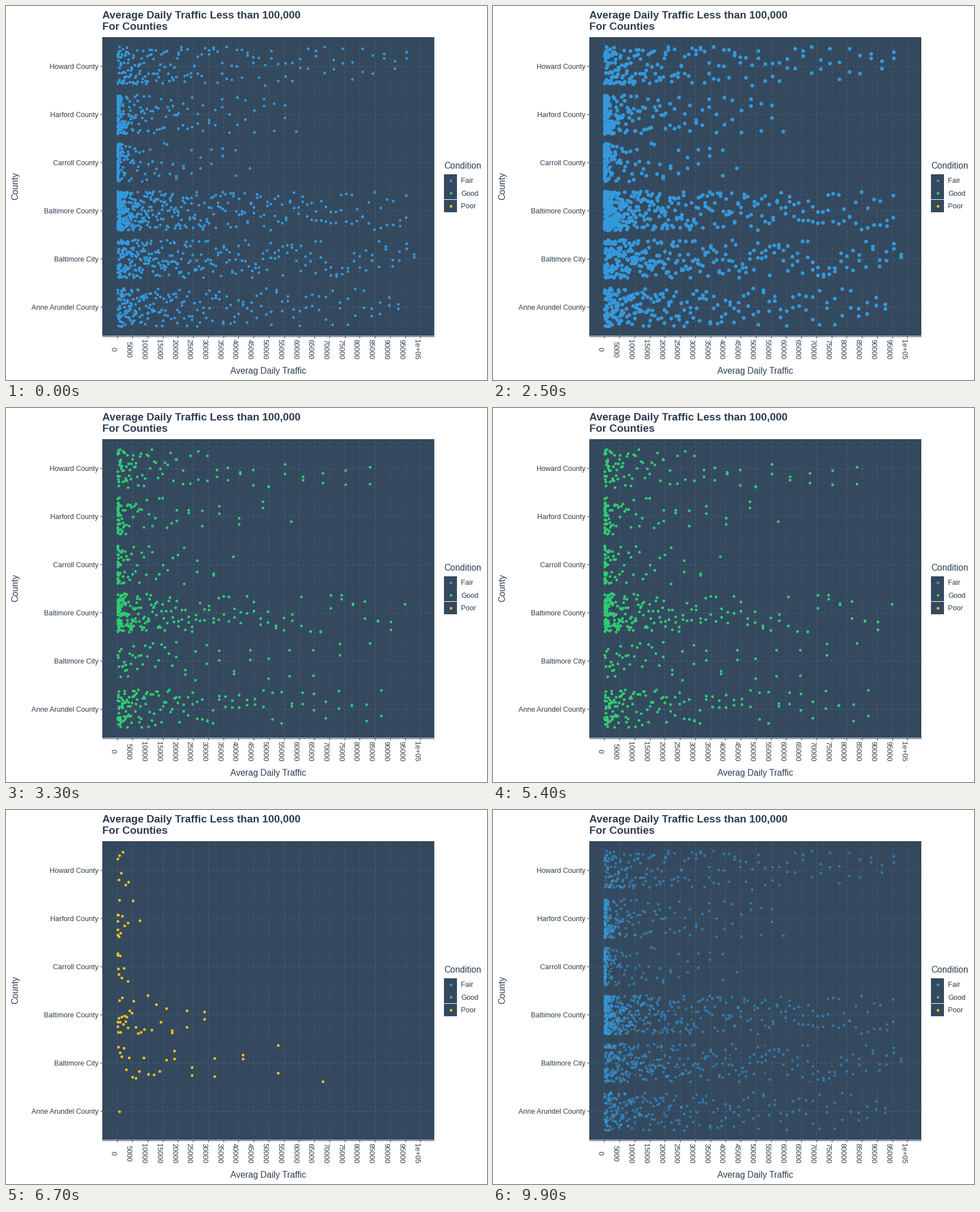
A matplotlib script that plays this animation: 849x660 px, repeating every 10000 ms.

```python
import math

import matplotlib.pyplot as plt
import numpy as np
from matplotlib.animation import FuncAnimation
from matplotlib.patches import Rectangle

W, H, DPI = 849, 660, 64
PT = 72 / DPI  # points per pixel
INK, PANEL, GRID = "#2c3e50", "#34495e", "#46627f"
CONDITIONS = {"Fair": "#3498db", "Good": "#2ecc71", "Poor": "#f1c40f"}
COUNTIES = ["Howard County", "Harford County", "Carroll County",
            "Baltimore County", "Baltimore City", "Anne Arundel County"]
# bridges, median and highest traffic in thousands, county by county
TRAFFIC = {
    "Fair": [(178, 14, 98.5), (185, 2.6, 60), (127, 1.1, 45),
             (440, 7, 97), (296, 14, 99.7), (228, 13, 95)],
    "Good": [(94, 7.5, 90), (79, 1.7, 60), (75, 1.2, 40),
             (219, 6, 96), (55, 13.5, 86), (144, 10, 91)],
    "Poor": [(7, 1.2, 4.4), (13, 0.7, 9), (8, 0.7, 4.2),
             (32, 5, 34), (25, 14, 72), (1, 0.7, 2)],
}
LEFT, RIGHT, TOP, BOTTOM = 170, 756, 55, 582
ROW_STEP = 85
RADIUS = 2.4
STEPS = 14
EXIT_STARTS = (20, 54, 87)

plt.rcParams["font.family"] = "Liberation Sans"
rng = np.random.default_rng(12)


def row_y(row):
    return 106 + ROW_STEP * row


def traffic_x(thousands):
    return 196.5 + 5.35 * thousands


def county_points(row, count, median, highest):
    """Exponentially spread traffic, jittered around the county's row."""
    rank = (np.arange(count) + 0.5) / count
    k = 2 * math.log(highest / median - 1)
    traffic = highest * np.expm1(k * rank) / math.expm1(k)
    # bridges on the same busy road share one count
    pairs = traffic[np.arange(count) // 2 * 2]
    traffic = np.where(traffic > 20, pairs, traffic)
    jitter = rng.uniform(-0.4, 0.4, count) * ROW_STEP
    return np.column_stack([traffic_x(traffic), row_y(row) + jitter])


def condition_points(name):
    return np.vstack([county_points(row, *stats)
                      for row, stats in enumerate(TRAFFIC[name])])


fig = plt.figure(figsize=(W / DPI, H / DPI), dpi=DPI, facecolor="white")
ax = fig.add_axes([0, 0, 1, 1])
ax.set(xlim=(0, W), ylim=(H, 0))
ax.axis("off")


def line(xs, ys, color=INK, **kw):
    ax.plot(xs, ys, color=color, lw=PT, solid_capstyle="butt", **kw)


def label(x, y, text, px, **kw):
    ax.text(x, y, text, fontsize=px * PT, color=INK, va="baseline",
            rotation_mode="anchor", **kw)


def marker_area(radius):
    return (2 * radius * PT) ** 2


def dots(xy, color, zorder):
    xs, ys = np.array(xy).T
    return ax.scatter(xs, ys, s=marker_area(RADIUS), c=color, lw=0, zorder=zorder)


ax.add_patch(Rectangle((LEFT, TOP), RIGHT - LEFT, BOTTOM - TOP, fc=PANEL, lw=0))
for row, county in enumerate(COUNTIES):
    y = row_y(row)
    line([LEFT, RIGHT], [y, y], GRID, ls=(0, (4, 4)))
    line([LEFT - 4, LEFT], [y, y])
    label(163.5, y + 4.7, county, 12.5, ha="right")
for i in range(21):
    x = traffic_x(5 * i)
    line([x, x], [BOTTOM, TOP], GRID, ls=(0, (4, 4)))
    line([x, x], [BOTTOM, BOTTOM + 4])
    label(x - 10.5, 606, "1e+05" if i == 20 else str(5000 * i), 12.8,
          ha="center", rotation=270)
line([LEFT, LEFT], [TOP, BOTTOM])
line([LEFT, RIGHT], [BOTTOM + 0.5, BOTTOM + 0.5])

label(170, 22.3, "Average Daily Traffic Less than 100,000", 18.7, weight="bold")
label(170, 42.3, "For Counties", 18.7, weight="bold")
label(463, 649.3, "Averag Daily Traffic", 15.5, ha="center")
label(21, 317, "County", 15.5, ha="center", rotation=90)

label(773, 287, "Condition", 15.5)
for i, (name, color) in enumerate(CONDITIONS.items()):
    y = 307.5 + 22.5 * i
    ax.add_patch(Rectangle((773, y - 11), 23, 22, fc=PANEL, lw=0))
    dots([(785, y)], color, 3)
    label(803.5, y + 4.8, name, 12.6)

layers = [dots(condition_points(name), color, 4)
          for name, color in CONDITIONS.items()]


def back_in(t):
    return t ** 3 - t * math.sin(math.pi * t)


def show(layer, scale=1.0, alpha=1.0, zorder=4):
    layer.set_visible(alpha > 0)
    layer.set_sizes([marker_area(RADIUS * scale ** 1.15)])
    layer.set_alpha(alpha)
    layer.set_zorder(zorder)


def draw(frame):
    for layer in layers:
        layer.set_visible(False)
    state = next(i for i, start in enumerate(EXIT_STARTS)
                 if frame < start + STEPS - 1)
    step = max(0, frame - EXIT_STARTS[state] + 1)
    progress = back_in(step / STEPS)
    show(layers[state], scale=1 - progress)
    # the next state fades in on top of the shrinking one
    show(layers[(state + 1) % 3], alpha=max(0.0, progress), zorder=5)
    return layers


anim = FuncAnimation(fig, draw, frames=100, interval=100, repeat=True,
                     repeat_delay=0, blit=False)
plt.show()
```
